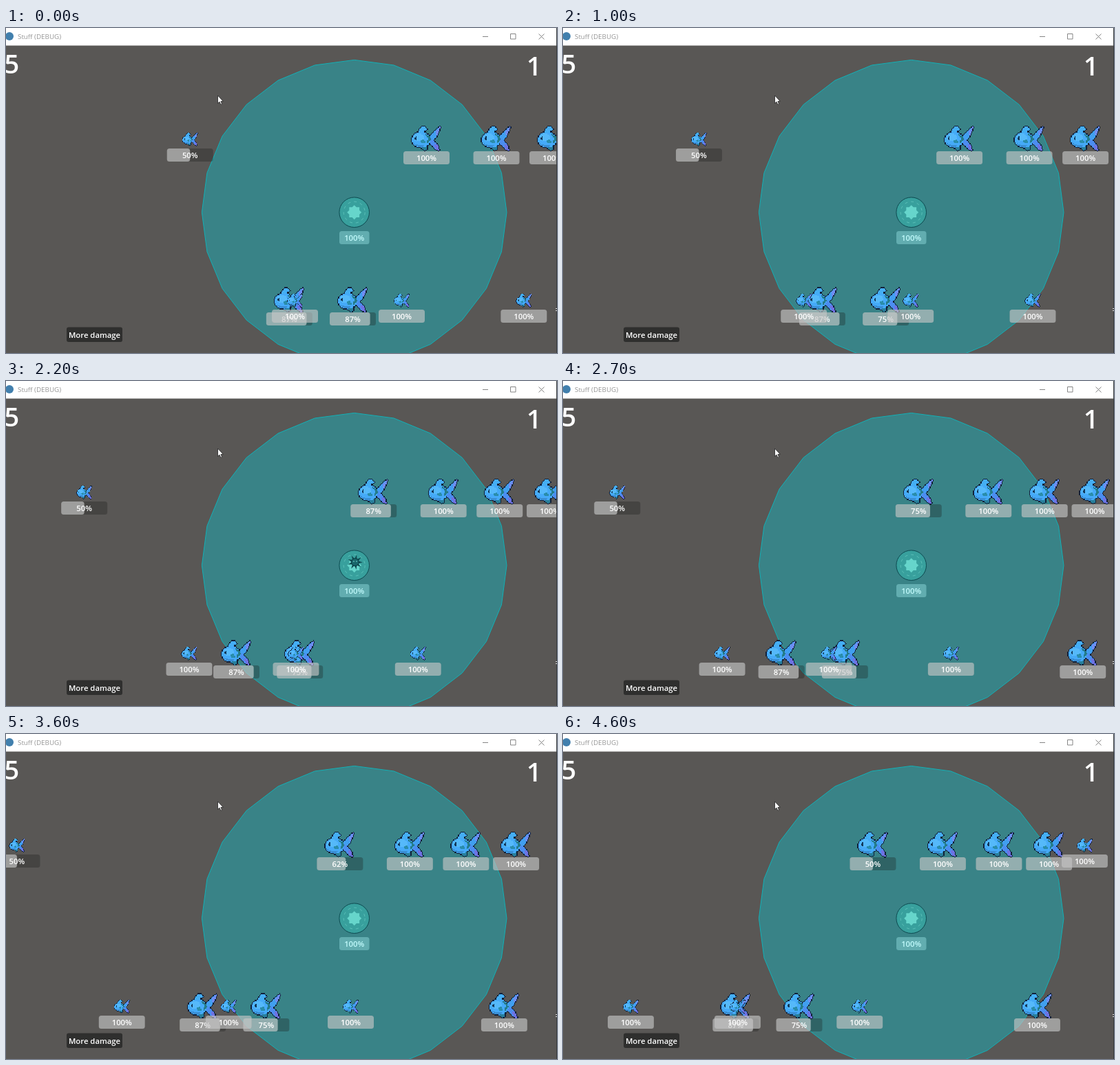
An HTML page with a canvas for the animation above (4700 ms loop, 800x472 px).

```html
<!DOCTYPE html>
<html lang="en">
<head>
<meta charset="utf-8">
<title>Stuff</title>
<style>
html, body { margin: 0; width: 800px; height: 472px; overflow: hidden; background: #595755; }
canvas { display: block; }
</style>
</head>
<body>
<canvas id="stage" width="800" height="472"></canvas>
<script>
const ctx = document.getElementById('stage').getContext('2d');
const LOOP = 4700, STEP = 100;
const FONT = '"Open Sans", "Noto Sans", sans-serif';
const TOWER = { x: 505.7, y: 267.7 };
const BAR_W = 67;

// Bar x at time zero, health, and the second at which the fish enters.
const fishes = [
  { x: 577, row: 161.5, big: true, hp: 100 },
  { x: 678.5, row: 161.5, big: true, hp: 100 },
  { x: 760, row: 161.5, big: true, hp: 100 },
  { x: 832.7, row: 161.5, big: true, hp: 100, from: 1.6 },
  { x: 377.8, row: 396, big: true, hp: 87.5 },
  { x: 470, row: 396, big: true, hp: 87.5 },
  { x: 815.5, row: 396, big: true, hp: 100, from: 2.6 },
  { x: 233.7, row: 162, hp: 50 },
  { x: 386, row: 396, hp: 100 },
  { x: 541, row: 396, hp: 100 },
  { x: 718.3, row: 396, hp: 100 },
  { x: 1045, row: 162, hp: 100, from: 3.9 }
];

// One shot per second, each costing its target an eighth.
const FLIGHT = 0.39;
const shots = [5, 0, 0, 0, 0].map((target, i) => ({ target: fishes[target], at: i + 0.183 }));

const barX = (f, t) => f.x - (f.big ? 34.9 : 69.8) * t;
const health = (f, t) =>
  f.hp - 12.5 * shots.filter(s => s.target === f && t >= s.at + FLIGHT).length;

function polygon(points) {
  const path = new Path2D();
  points.forEach(([x, y]) => path.lineTo(x, y));
  path.closePath();
  return path;
}

function oval(x, y, rx, ry) {
  const path = new Path2D();
  path.ellipse(x, y, rx, ry, 0, 0, 2 * Math.PI);
  return path;
}

function star(x, y, outer, inner, spikes, turn = 0) {
  return polygon(Array.from({ length: spikes * 2 }, (_, i) => {
    const a = turn + i * Math.PI / spikes, r = i % 2 ? inner : outer;
    return [x + r * Math.sin(a), y - r * Math.cos(a)];
  }));
}

// Rasterises simple shapes onto a coarse grid and rings them with a dark edge.
function makeFish() {
  const w = 34, h = 30;
  const canvas = document.createElement('canvas');
  canvas.width = w;
  canvas.height = h;
  const g = canvas.getContext('2d');
  const shapes = [
    [polygon([[18, 13], [26, 4], [31, 1], [29.5, 6], [27, 11], [23, 16]]), '#419ff0'],
    [polygon([[19, 12], [24, 15], [28, 20], [30.5, 27], [26, 24.5], [19, 18]]), '#4c8df0'],
    [polygon([[25, 19], [28, 20], [30.5, 27], [26, 24.5]]), '#6f72e2'],
    [polygon([[26, 6], [31, 1], [29.5, 6], [27, 11]]), '#6f8df2'],
    [polygon([[7, 9], [9, 3.5], [12, 1], [15, 1.5], [17, 4], [14, 5], [14, 9]]), '#45aef4'],
    [polygon([[11, 21], [17, 19], [17.5, 24], [14, 26]]), '#287f9b'],
    [oval(10.8, 14.5, 10, 8), '#45aaf8'],
    [oval(8.5, 12.2, 5.5, 4), '#55b9fa'],
    [polygon([[14, 7.5], [20, 11], [21, 15], [17, 18], [18, 13]]), '#247c8b'],
    [polygon([[10, 15], [14, 14], [15, 18], [11, 18.5]]), '#2a8dab'],
    [polygon([[3, 18], [9, 20.5], [15, 20], [11, 23], [6, 21]]), '#398ed4'],
    [oval(5.2, 13, 1.2, 1.6), '#12395c']
  ];
  const shade = (x, y) => {
    const hit = shapes.filter(([path]) => g.isPointInPath(path, x - 0.5, y - 0.5)).pop();
    return hit && hit[1];
  };
  for (let y = 0; y < h; y++) for (let x = 0; x < w; x++) {
    const near = [[1, 0], [-1, 0], [0, 1], [0, -1]].some(([dx, dy]) => shade(x + dx, y + dy));
    const color = shade(x, y) || (near && '#12213a');
    if (!color) continue;
    g.fillStyle = color;
    g.fillRect(x, y, 1, 1);
  }
  return canvas;
}

const fishArt = makeFish();
const range = star(TOWER.x, TOWER.y, 221.3, 221.3, 12);

function paint(path, fill, stroke, width = 1) {
  if (fill) { ctx.fillStyle = fill; ctx.fill(path); }
  if (stroke) { ctx.strokeStyle = stroke; ctx.lineWidth = width; ctx.stroke(path); }
}

function box(x, y, w, h, r, color) {
  ctx.fillStyle = color;
  ctx.beginPath();
  ctx.roundRect(x, y, w, h, r);
  ctx.fill();
}

function label(text, x, y, size, color = '#fff', align = 'center', weight = 600) {
  ctx.font = `${weight} ${size}px ${FONT}`;
  ctx.textAlign = align;
  ctx.fillStyle = color;
  ctx.fillText(text, x, y);
}

function drawFish(f, t) {
  if (t < (f.from || 0)) return;
  const x = barX(f, t), mid = x + BAR_W / 2;
  const w = f.big ? 47 : 24.5, h = f.big ? 42 : 22;
  const y = Math.round(f.row + (f.big ? 17.3 : 13)), hp = health(f, t);
  ctx.imageSmoothingEnabled = false;
  ctx.drawImage(fishArt, mid - w / 2 - (f.big ? 0.5 : 0), f.row - h / 2, w, h);
  box(x, y, BAR_W, 19, 3.5, 'rgba(25,25,25,.3)');
  box(x, y, BAR_W * hp / 100, 19, 3.5, 'rgba(255,255,255,.48)');
  label(Math.floor(hp) + '%', mid, y + 13.8, 11.3);
}

function drawTower() {
  const { x, y } = TOWER;
  paint(range, '#398387', '#12b1b7');
  paint(oval(x, y, 21.8, 21.8), '#38a09d', '#0d4a50');
  ctx.setLineDash([4, 5]);
  paint(oval(x, y, 15.5, 15.5), null, '#5cc0b8');
  ctx.setLineDash([]);
  paint(star(x, y, 10.5, 8, 8), '#66d5cb');
  box(484, 295, 43.5, 19, 3.5, '#62adb0');
  label('100%', 505.7, 308.8, 11.3, '#c2fbfc');
}

function drawShot(s, t) {
  const p = (t - s.at) / FLIGHT;
  if (p < 0 || p >= 1) return;
  const dx = barX(s.target, t) + BAR_W / 2 - TOWER.x;
  const dy = s.target.row - TOWER.y;
  ctx.fillStyle = '#8fc4c4';
  [0.34, 0.66].filter(q => q < p).forEach(q =>
    ctx.fillRect(Math.round(TOWER.x + dx * q), Math.round(TOWER.y + dy * q), 1, 1));
  const x = TOWER.x + dx * p, y = TOWER.y + dy * p;
  paint(star(x, y, 11, 5, 9, 0.2), '#0e4a50');
  paint(oval(x, y, 5.5, 5.5), '#19666a', '#0c3c43');
  paint(oval(x - 2, y - 1, 1, 1), '#58b3ae');
  paint(oval(x + 2, y - 1, 1, 1), '#58b3ae');
}

function drawWindow() {
  box(0, 0, 800, 25.5, 0, '#fff');
  paint(oval(5, 12, 6, 6), '#417fad');
  label('Stuff (DEBUG)', 17, 16, 9.8, '#969696', 'left', 400);
  ctx.strokeStyle = '#858585';
  ctx.lineWidth = 1;
  ctx.beginPath();
  ctx.moveTo(692, 12.5); ctx.lineTo(700, 12.5);
  ctx.rect(732.5, 8.5, 7.5, 7.5);
  ctx.moveTo(773.5, 8.5); ctx.lineTo(781.5, 16.5);
  ctx.moveTo(781.5, 8.5); ctx.lineTo(773.5, 16.5);
  ctx.stroke();
  box(799, 0, 1, 472, 0, '#34383a');
  box(798, 407, 2, 1, 0, '#ddd');
  box(798, 410, 2, 1, 0, '#ddd');
}

function drawInterface() {
  label('5', -2.5, 66, 38, '#fff', 'left');
  label('1', 766.5, 69, 38);
  box(88, 434.5, 81, 21.5, 3, '#2f2f2e');
  label('More damage', 128.5, 449.5, 11.3);
}

function drawCursor() {
  paint(polygon([[307.5, 98], [307.5, 109.5], [310, 107.2], [311.8, 111.2],
    [313.6, 110.4], [311.9, 106.6], [315.2, 106.3]]), '#fff', '#222', 0.8);
}

function draw(t) {
  box(0, 0, 800, 472, 0, '#595755');
  drawTower();
  fishes.forEach(f => drawFish(f, t));
  shots.forEach(s => drawShot(s, t));
  drawInterface();
  drawWindow();
  drawCursor();
}

const start = performance.now();
function tick() {
  const ms = (performance.now() - start) % LOOP;
  draw(Math.floor(ms / STEP) * STEP / 1000);
  requestAnimationFrame(tick);
}
tick();
</script>
</body>
</html>
```
